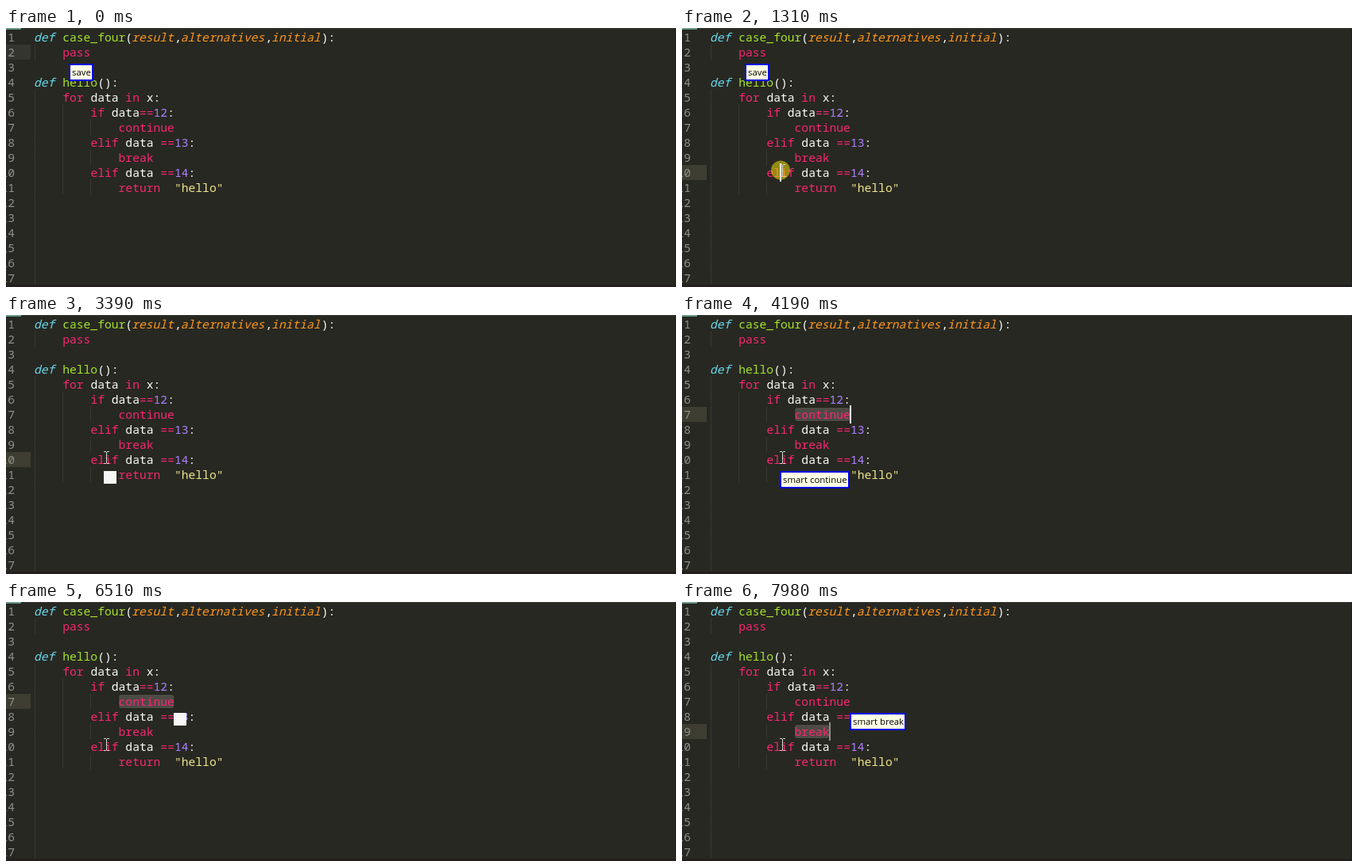
Animation, 843 px wide and 327 px high, one loop 8000 ms. Source, as an HTML page with a canvas:

```html
<!DOCTYPE html>
<html lang="en">
<head>
<meta charset="utf-8">
<style>
  html, body { margin: 0; overflow: hidden; background: #272822; }
  canvas { display: block; }
</style>
</head>
<body>
<canvas width="843" height="327"></canvas>
<script>
const ctx = document.querySelector('canvas').getContext('2d');
const LOOP = 8000, LEFT = 36, CHAR = 8.797, LINE = 19, BLINK = 1060;
const rowTop = row => 2 + LINE * (row - 1);
const colX = col => LEFT + CHAR * col;
const clamp = v => Math.min(1, Math.max(0, v));

const code = [
  'def case_four(result,alternatives,initial):',
  '    pass',
  '',
  'def hello():',
  '    for data in x:',
  '        if data==12:',
  '            continue',
  '        elif data ==13:',
  '            break',
  '        elif data ==14:',
  '            return  "hello"'
];

const styles = [
  [/^def$/, '#66d9ef', 'italic '],
  [/^(case_four|hello)$/, '#a6e22e', ''],
  [/^(result|alternatives|initial)$/, '#fd971f', 'italic '],
  [/^(pass|for|in|if|elif|continue|break|return|==)$/, '#f92672', ''],
  [/^\d/, '#ae81ff', ''],
  [/^"/, '#f0e68c', ''],
  [/./, '#fcfcf8', '']
];

// Each cue changes part of the state and holds until overridden.
const cues = [
  { at: 0, row: 2, tip: 'save', x: 79, y: 45 },
  { at: 70, pointer: 'beam' },
  { at: 1310, pointer: 'click', row: 10, col: 10, caretFrom: 1310 },
  { at: 1450, pointer: 'arrow' },
  { at: 2460, x: 123, y: 197 },
  { at: 2630, pointer: 'beam', tip: '' },
  { at: 3560, tip: 'smart continue' },
  { at: 3710, row: 7, col: 20, selected: 8, caretFrom: 3710 },
  { at: 5350, x: 211, y: 140 },
  { at: 5580, tip: '' },
  { at: 6660, tip: 'smart break' },
  { at: 6740, row: 9, col: 17, selected: 5, caretFrom: 6740 }
];
const stateAt = t => Object.assign({}, ...cues.filter(cue => cue.at <= t));

// Solid after a move, then a soft blink.
function caretAlpha(age) {
  return clamp(1.5 * Math.cos(Math.max(0, age - 390) / BLINK * 2 * Math.PI));
}

function beamPosition(t) {
  const enter = clamp((t - 70) / 160), travel = clamp((t - 440) / 550);
  return [
    392 - 147 * enter - 122 * travel,
    284 - 43 * enter - 69 * travel - 45 * Math.sin(Math.PI * travel)
  ].map(Math.round);
}

function rect(color, x, y, w, h) {
  ctx.fillStyle = color;
  ctx.fillRect(x, y, w, h);
}

function label(text, x, y, color, font) {
  ctx.font = font;
  ctx.fillStyle = color;
  ctx.fillText(text, x, y);
}

function guide(x, firstRow, lastRow) {
  ctx.beginPath();
  ctx.moveTo(x + .5, rowTop(firstRow));
  ctx.lineTo(x + .5, rowTop(lastRow + 1));
  ctx.stroke();
}

function drawCode() {
  const mono = '14.66px "Noto Sans Mono", monospace';
  ctx.textAlign = 'right';
  for (let r = 1; r <= 17; r++) label(r, 11, rowTop(r) + 15, '#8f908a', mono);
  ctx.textAlign = 'left';
  code.forEach((line, i) => {
    for (const { 0: token, index } of line.matchAll(/"\w+"|==|\w+|\S/g)) {
      const [, color, slant] = styles.find(([pattern]) => pattern.test(token));
      const x = colX(index) - (slant ? 1 : 0);
      label(token, x, rowTop(i + 1) + 15, color, slant + '500 ' + mono);
    }
  });
}

function drawEditor({ row, col, selected, caretFrom }, t) {
  rect('#272822', 0, 0, 843, 327);
  rect('#3a3b36', 0, 0, 843, 1);
  rect('#6f9a88', 0, 0, 19, 2);
  rect('#1f201b', 842, 0, 1, 327);
  rect(col ? '#3e3d32' : '#34352f', 0, rowTop(row), 31, LINE);

  ctx.strokeStyle = '#46473f';
  ctx.setLineDash([1, 1]);
  guide(36, 2, 2);
  guide(36, 5, 17);
  guide(71, 6, 11);
  for (const r of [7, 9, 11]) guide(106, r, r);
  ctx.setLineDash([]);

  if (selected) {
    ctx.fillStyle = '#4d4b45';
    ctx.strokeStyle = '#222218';
    ctx.beginPath();
    ctx.roundRect(colX(col - selected), rowTop(row) + .5, CHAR * selected, LINE - 1, 3);
    ctx.fill();
    ctx.stroke();
  }

  drawCode();
  rect('#231f1d', 0, 324, 843, 3);

  if (col) {
    ctx.globalAlpha = caretAlpha(t - caretFrom);
    rect('#f8f8f0', Math.floor(colX(col) - .5), rowTop(row) - 2, 2, 23);
    ctx.globalAlpha = 1;
  }
}

function drawTip({ tip, x, y }) {
  if (!tip) return rect('#f6f6f6', x, y, 16, 16);
  ctx.font = '11.4px "Open Sans", sans-serif';
  const width = Math.round(ctx.measureText(tip).width) + 7;
  rect('#0000e6', x, y, width, 22);
  rect('#ffffe6', x + 2, y + 2, width - 4, 18);
  label(tip, x + 4, y + 15, '#000', ctx.font);
}

function drawArrow() {
  const arrow = new Path2D('M124.5 179.5v16l4-3.5 2.5 6 2.5-1-2.5-6h5z');
  ctx.fillStyle = '#fff';
  ctx.fill(arrow);
  ctx.strokeStyle = '#000';
  ctx.stroke(arrow);
}

function drawClick() {
  ctx.fillStyle = 'rgba(255, 240, 0, .5)';
  ctx.beginPath();
  ctx.arc(124, 179.5, 12, 0, 2 * Math.PI);
  ctx.fill();
  rect('#f8f8f0', 123, 171, 2, 23);
}

function drawBeam([x, y]) {
  const color = '#d8d8d4';
  for (const edge of [y, y + 15]) {
    rect(color, x, edge, 3, 1);
    rect(color, x + 4, edge, 3, 1);
  }
  rect(color, x + 3, y + 1, 1, 14);
}

function frame(now) {
  const t = now % LOOP, state = stateAt(t);
  drawEditor(state, t);
  drawTip(state);
  if (state.pointer === 'click') drawClick();
  if (state.pointer === 'arrow') drawArrow();
  else if (state.pointer) drawBeam(beamPosition(t));
  requestAnimationFrame(frame);
}
requestAnimationFrame(frame);
</script>
</body>
</html>
```
